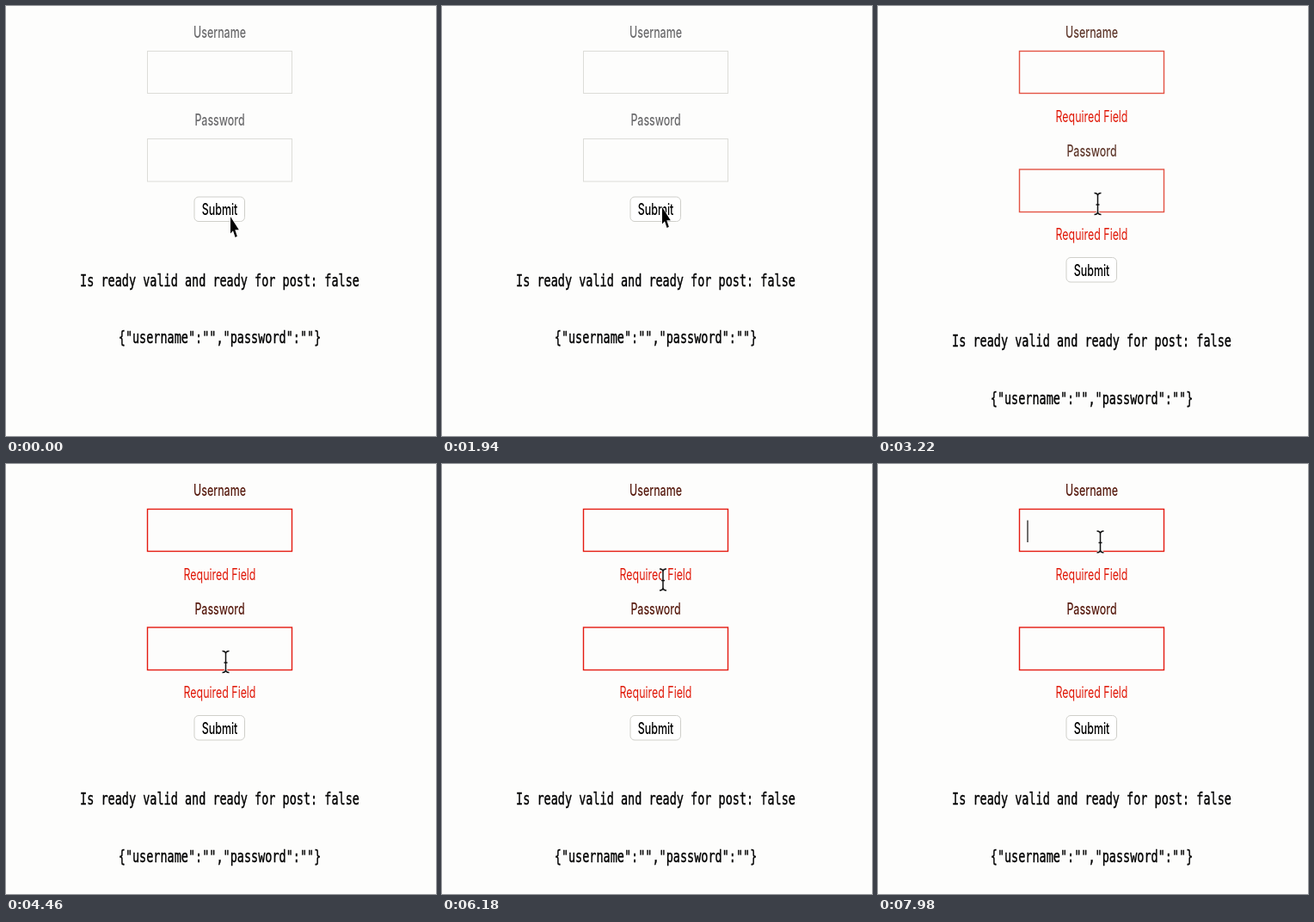
An HTML page that plays this animation: 500x500 px, repeating every 8000 ms.

```html
<!DOCTYPE html>
<html lang="en">
<head>
<meta charset="utf-8">
<title>Form validation</title>
<style>
  html, body { margin: 0; width: 100%; height: 100%; overflow: hidden; background: #fdfdfc; }
  svg { display: block; width: 100%; height: 100%; }
  text { font: 500 18.4px Inter, sans-serif; text-anchor: middle; }
  .mono { font: 20px "DejaVu Sans Mono", monospace; stroke: #000; stroke-width: .45; white-space: pre; }
  .error { fill: #e01808; font-weight: 400; }
  .button { fill: #fff; stroke: #cfcfca; }
  .input { fill: none; }
</style>
</head>
<body>
<svg viewBox="0 0 500 500" preserveAspectRatio="none">
  <!-- The whole form is shown horizontally condensed -->
  <defs>
    <g id="error"><text class="error" transform="translate(248.5) scale(.675 1)">Required Field</text></g>
    <path id="beamShape" d="M-4 -12.5Q0 -12.5 0 -9Q0 -12.5 4 -12.5M-4 12.5Q0 12.5 0 9Q0 12.5 4 12.5M0 -9V9M-2 1H2"/>
  </defs>

  <g class="label" transform="translate(248.5 37) scale(.675 1)"><text>Username</text></g>
  <rect class="input" x="164.5" y="52.5" width="168" height="49"/>
  <use class="message" href="#error" y="134.5"/>

  <g id="password">
    <g class="label" transform="translate(248.5 139) scale(.675 1)"><text>Password</text></g>
    <rect class="input" x="164.5" y="154.5" width="168" height="49.5"/>
    <use class="message" href="#error" y="236.5"/>
  </g>

  <g id="footer">
    <rect class="button" x="219" y="222" width="58.5" height="28.5" rx="5"/>
    <g transform="translate(248.5) scale(.675 1)">
      <text y="243.5">Submit</text>
      <text class="mono" y="326">Is ready valid and ready for post: false</text>
      <text class="mono" y="392.5">{"username":"","password":""}</text>
    </g>
  </g>

  <path id="caret" d="M174 65.5V91" stroke="#333" stroke-width="1.4"/>
  <path id="arrow" d="M0 0V19.5L3 16.3L5.6 24L7.8 22.8L5.3 15.3H9.8Z"
        stroke="#fff" stroke-width="1.2" paint-order="stroke"/>
  <g id="beam" fill="none">
    <use href="#beamShape" stroke="#fff" stroke-width="3.2"/>
    <use href="#beamShape" stroke="#111" stroke-width="1.5"/>
  </g>
</svg>
<script>
const DURATION = 8000, SUBMIT = 2680, CARET = 7480;
const byId = id => document.getElementById(id);
const all = name => document.querySelectorAll('.' + name);

// Pointer stops: time, x, y
const pointer = [
  [0, 261, 245], [1100, 261, 245], [1840, 256, 234], [1940, 256, 234],
  [2400, 255.5, 230], [5200, 255.5, 230], [5760, 256.5, 188.5],
  [6200, 257, 132], [6550, 257.5, 92], [6700, 257.5, 91.5],
  [7000, 258.5, 90.5], [DURATION, 258.5, 90.5]
];

const clamp = v => Math.max(0, Math.min(1, v));
const mix = (a, b, k) => a + (b - a) * k;
const mixColor = (a, b, k) => `rgb(${a.map((v, i) => Math.round(mix(v, b[i], k)))})`;

function pointerAt(t) {
  const next = pointer.findIndex(stop => stop[0] > t);
  const [t0, x0, y0] = pointer[next - 1], [t1, x1, y1] = pointer[next];
  const k = (t - t0) / (t1 - t0);
  return [mix(x0, x1, k), mix(y0, y1, k)];
}

const show = (element, visible) => element.style.display = visible ? '' : 'none';

function render(t) {
  const submitted = t >= SUBMIT;
  const fade = clamp((t - 2960) / 500);
  const labelColor = submitted ? mixColor([104, 88, 76], [88, 28, 16], fade) : 'rgb(106,106,108)';
  const borderColor = submitted ? mixColor([226, 146, 124], [228, 26, 16], fade) : 'rgb(220,220,216)';

  all('label').forEach(el => el.setAttribute('fill', labelColor));
  all('input').forEach(el => {
    el.setAttribute('stroke', borderColor);
    el.setAttribute('stroke-width', submitted ? 1.4 : 1);
  });
  all('message').forEach(el => show(el, submitted));
  byId('password').setAttribute('transform', `translate(0 ${submitted ? 35.5 : 0})`);
  byId('footer').setAttribute('transform', `translate(0 ${submitted ? 70.5 : 0})`);

  const place = `translate(${pointerAt(t)})`;
  for (const [id, visible] of [['arrow', !submitted], ['beam', submitted]]) {
    byId(id).setAttribute('transform', place);
    show(byId(id), visible);
  }
  show(byId('caret'), t >= CARET);
}

function tick() {
  render(performance.now() % DURATION);
  requestAnimationFrame(tick);
}
tick();
</script>
</body>
</html>
```
